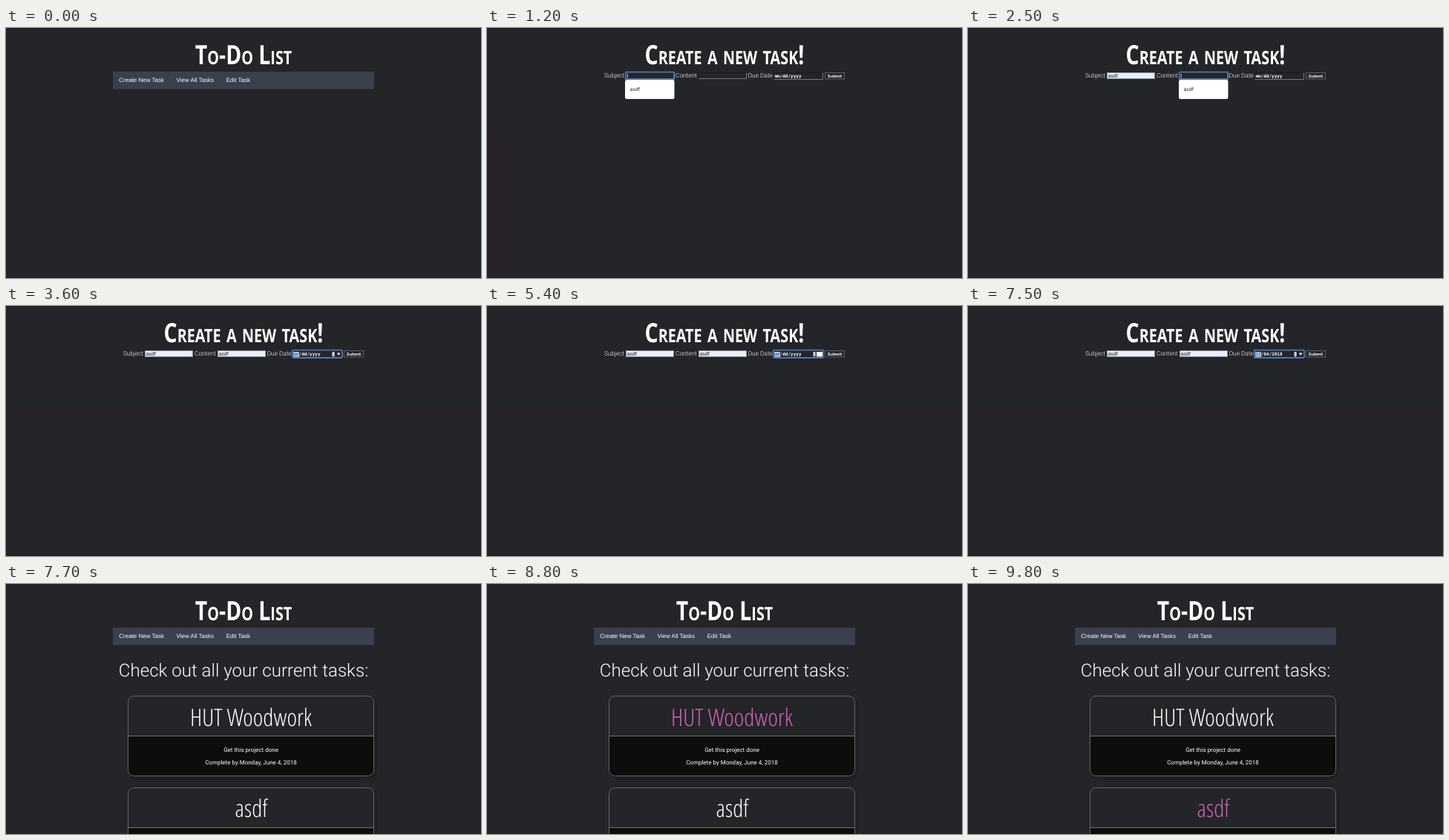
Write an HTML page that moves like this. It is 640 by 338 pixels and loops after 9900 ms.

```html
<!DOCTYPE html>
<html lang="en">
<head>
<meta charset="utf-8">
<title>To-Do List</title>
<style>
@property --t { syntax: "<number>"; inherits: true; initial-value: 0; }
@keyframes clock { from { --t: 0; } to { --t: 9900; } }
@keyframes hover-first {
  0% { fill: #fff; } 88.88% { fill: #d062b8; } 92.92% { fill: #f2cfea; }
  93.93% { fill: #faeef8; } 94.94%, 100% { fill: #fff; }
}
@keyframes hover-second { 0% { fill: #fff; } 98.98%, 100% { fill: #d062b8; } }

html, body { margin: 0; width: 100%; height: 100%; overflow: hidden; background: #232528; }
svg { display: block; width: 640px; height: 338px; animation: clock 9900ms linear infinite; }

/* Visible from --a until --b, in ms */
.at { opacity: clamp(0, min(var(--t) - var(--a, 0) + 1, var(--b, 9901) - var(--t)), 1); }

text { fill: #fff; font: 8px Roboto, sans-serif; text-rendering: geometricPrecision; }
.mid { text-anchor: middle; }
/* The bold face has no condensed cut, so it is narrowed here */
.title {
  font: 700 36px "Open Sans", sans-serif; font-variant: small-caps; text-anchor: middle;
  transform-box: fill-box; transform-origin: center; transform: scaleX(.79);
}
.card { font: 300 32.6px "Open Sans", sans-serif; font-stretch: 75%; text-anchor: middle; }
.first { animation: hover-first 9900ms step-end infinite; }
.second { animation: hover-second 9900ms step-end infinite; }
.lead { font-size: 24.1px; font-weight: 300; }
.nav { font-family: "Liberation Sans", Arial, sans-serif; }
.label { font-size: 8.3px; font-weight: 300; }
.mono { font: 6px "DejaVu Sans Mono", monospace; }
.bold { font-weight: 700; }
.value { font: 7px "Liberation Sans", Arial, sans-serif; }
.button { font: 700 5.7px "Liberation Sans", Arial, sans-serif; }
.small { font: 6.1px Inter, sans-serif; }
.dark { fill: #1c1c1e; }
.picked { fill: #5a6f90; }
.faded { fill: #ababab; }
.ring { fill: none; stroke: #4a76b4; stroke-width: 1.8; }
</style>
</head>
<body>
<svg viewBox="0 0 640 338">
  <defs>
    <g id="field">
      <path d="M.5 9V.5H65" fill="none" stroke="#1a1b1d"/>
      <path d="M.5 8.5H64.5V.5" fill="none" stroke="#77787b"/>
    </g>
    <g id="filled">
      <rect x=".5" y=".5" width="64" height="8" fill="#e8eefc" stroke="#8f939b"/>
      <text class="value dark" x="1.4" y="6.9">asdf</text>
    </g>
    <rect id="ring" class="ring" x="-.4" y="-.4" width="65.8" height="9.8" rx="1"/>
    <path id="caret" d="M2.2 1.8V7.4" stroke="#fff" stroke-width=".8"/>
    <rect id="menu" x="-1" y="10" width="66.5" height="26" rx="2.5" fill="#fff"/>
    <rect id="row" x="-1" y="14" width="66.5" height="17.5" fill="#e2e2e5"/>
    <text id="choice" class="small dark" style="font-size:6.5px" x="5.6" y="25.2">asdf</text>
    <filter id="soft"><feGaussianBlur stdDeviation="1.5"/></filter>
    <g id="card">
      <rect x="167" y="154" width="331" height="109" rx="8" fill="#1b1c1f" filter="url(#soft)"/>
      <rect x="164.5" y="151.5" width="331" height="108" rx="8" fill="#232528"/>
      <path d="M164.5 206H495.5V251.5a8 8 0 0 1-8 8H172.5a8 8 0 0 1-8-8Z" fill="#0d0d0d"/>
      <path d="M164.5 205.5H495.5" stroke="#707175"/>
      <rect x="164.5" y="151.5" width="331" height="108" rx="8" fill="none" stroke="#65666a"/>
    </g>
  </defs>

  <rect width="640" height="338" fill="#232528"/>
  <text class="title" x="320" y="48.5">To-Do List</text>
  <rect x="144" y="59" width="352" height="23.5" fill="#3b404e"/>
  <text class="nav" x="152.3" y="73.3">Create New Task</text>
  <text class="nav" x="229.6" y="73.3">View All Tasks</text>
  <text class="nav" x="296.7" y="73.3">Edit Task</text>

  <g class="at" style="--a:7600">
    <text class="mid lead" x="320" y="125">Check out all your current tasks:</text>
    <use href="#card"/>
    <use href="#card" y="124"/>
    <text class="card first" x="330" y="191.5">HUT Woodwork</text>
    <text class="mid" x="330" y="226.8">Get this project done</text>
    <text class="mid" x="330" y="244.2">Complete by Monday, June 4, 2018</text>
    <text class="card second" x="330.5" y="315">asdf</text>
  </g>

  <g class="at" style="--a:200;--b:7600">
    <rect width="640" height="338" fill="#232528"/>
    <rect y="136" width="640" height="202" fill="#272429"/>
    <text class="title" x="320" y="48.5">Create a new task!</text>
    <text class="label" x="158" y="66.8">Subject</text>
    <text class="label" x="254" y="66.8">Content</text>
    <text class="label" x="351.7" y="66.8">Due Date</text>
    <rect x="455.5" y="60.5" width="26" height="8.5" fill="#232528" stroke="#5d5e61"/>
    <text class="mid button" x="468.5" y="66.9">Submit</text>

    <g transform="translate(187 60)">
      <use href="#field"/>
      <use href="#filled" class="at" style="--a:1600"/>
      <use href="#ring" class="at" style="--a:1200;--b:2500"/>
      <use href="#caret" class="at" style="--a:1200;--b:1600"/>
      <g class="at" style="--a:1200;--b:2000">
        <use href="#menu"/>
        <use href="#row" class="at" style="--a:1600"/>
        <use href="#choice"/>
      </g>
    </g>

    <g transform="translate(285 60)">
      <use href="#field"/>
      <use href="#filled" class="at" style="--a:2800"/>
      <use href="#ring" class="at" style="--a:2500;--b:3500"/>
      <use href="#caret" class="at" style="--a:2500;--b:2800"/>
      <g class="at" style="--a:2500;--b:3000">
        <use href="#menu"/>
        <use href="#row" class="at" style="--a:2800"/>
        <use href="#choice"/>
      </g>
    </g>

    <g transform="translate(386 60)">
      <path d="M.5 9.5V.5H66.5" fill="none" stroke="#1a1b1d"/>
      <path d="M.5 9.5H66.5V.5" fill="none" stroke="#77787b"/>
      <g class="at" style="--b:6800">
        <text class="mono bold" x="1.4" y="7.1">mm/dd/yyyy</text>
      </g>
      <g class="at" style="--a:6800">
        <text class="mono bold" x="1.4" y="7.1">12/04/2018</text>
      </g>
      <g class="at" style="--a:3500">
        <rect class="ring" x="-.2" y="-.3" width="67.2" height="10.3" rx="1"/>
        <rect x="1.2" y="2" width="7.8" height="6.8" fill="#b3d0f5"/>
        <text class="mono bold picked at" style="--b:6800" x="1.4" y="7.1">mm</text>
        <text class="mono bold picked at" style="--a:6800" x="1.4" y="7.1">12</text>
        <rect x="53.5" y="2" width="3.2" height="6.4" rx="1.4" fill="#f2f2f2"/>
        <path d="M54.3 4.5l.8-1.2.8 1.2zM54.3 5.9l.8 1.2.8-1.2z" fill="#333"/>
        <path d="M59.9 3.5h4.6l-2.3 3.6z" fill="#fff"/>
        <rect class="at" style="--a:4700;--b:5500" x="58" y="2" width="8" height="6.5" fill="#fff"/>
      </g>
    </g>

    <g id="calendar" class="at" style="--a:5500;--b:6800">
      <rect x="385.8" y="70.5" width="131.5" height="101.2" fill="#fff" stroke="#b4b6ba"/>
      <text class="small dark" x="393.6" y="84.2">December 2018</text>
      <path d="M441.5 81h4.2l-2.1 3.2z" fill="#222"/>
      <g fill="#eee" stroke="#bdbdbd">
        <rect x="471.5" y="75.5" width="12" height="12" rx="1"/>
        <rect x="485.5" y="75.5" width="12" height="12" rx="1"/>
        <rect x="499.5" y="75.5" width="12" height="12" rx="1"/>
      </g>
      <path d="M478.7 79.8v3.6l-2.3-1.8zM504.4 79.8v3.6l2.3-1.8z" fill="#555"/>
      <circle cx="491.5" cy="81.6" r="1.5" fill="#555"/>
      <rect x="391.5" y="93.5" width="120" height="73" fill="#fff" stroke="#a7b7d0"/>
      <path d="M392 105.5H511" stroke="#d5dce8"/>
      <rect class="at" style="--a:5900;--b:6200" x="409" y="106" width="17" height="10" fill="#b9cbe6"/>
      <rect class="at" style="--a:6200" x="426" y="116" width="16.5" height="9.5" fill="#b9cbe6"/>
    </g>
  </g>
</svg>
<script>
const calendar = document.getElementById("calendar");

function addCell(label, column, y, tone) {
  const cell = document.createElementNS("http://www.w3.org/2000/svg", "text");
  cell.setAttribute("class", `mid small ${tone}`);
  cell.setAttribute("x", 400.2 + column * 17.05);
  cell.setAttribute("y", y);
  cell.textContent = label;
  calendar.append(cell);
}

["Sun", "Mon", "Tue", "Wed", "Thu", "Fri", "Sat"]
  .forEach((day, column) => addCell(day, column, 102, "dark"));

for (let i = 0; i < 42; i++) {
  const date = new Date(2018, 10, 25 + i);
  const tone = date.getMonth() === 11 ? "dark" : "faded";
  addCell(date.getDate(), i % 7, 113.1 + Math.floor(i / 7) * 10, tone);
}
</script>
</body>
</html>
```
